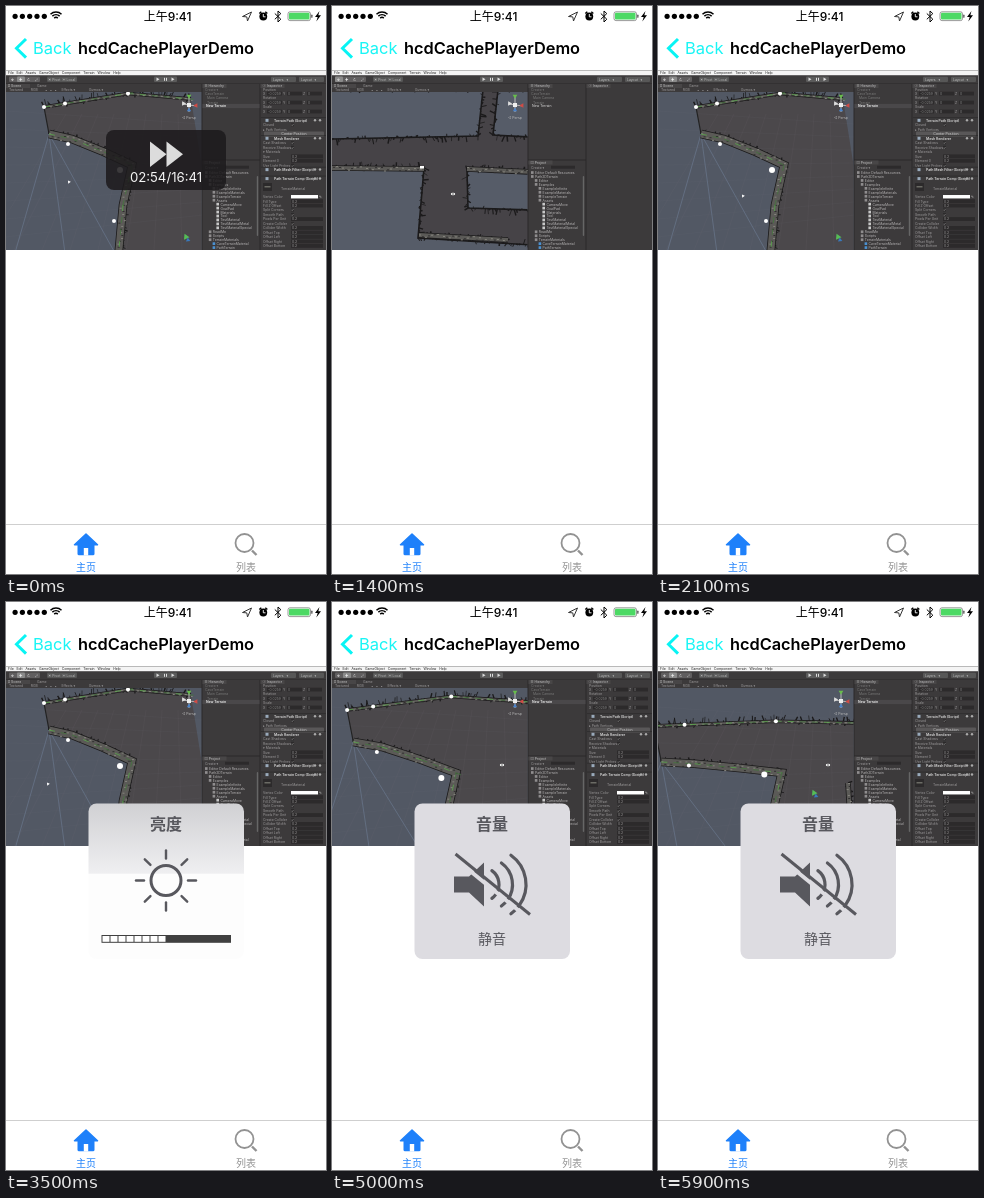
An HTML page with a canvas for the animation above (6 s loop, 320x568 px).

```html
<!DOCTYPE html>
<html lang="zh">
<head>
<meta charset="utf-8">
<style>
html, body { margin: 0; width: 100%; height: 100%; overflow: hidden; background: #fff; }
canvas { display: block; width: 320px; height: 568px; }
</style>
</head>
<body>
<canvas id="stage"></canvas>
<script>
const canvas = document.getElementById('stage');
const ratio = window.devicePixelRatio || 1;
canvas.width = 320 * ratio;
canvas.height = 568 * ratio;
const c = canvas.getContext('2d');
const FONT = "Inter, 'Noto Sans CJK SC', 'Noto Sans CJK', sans-serif";
const LOOP = 6000;
const PANEL = '#3c3a3b', FIELD = '#2c2a2b', SKY = '#525864', GROUND = '#4b484b', INK = '#58585e';

const clamp = (v) => Math.max(0, Math.min(1, v));
const ease = (v) => (v = clamp(v)) * v * (3 - 2 * v);
const mix = (a, b, k) => a + (b - a) * k;
const noise = (n) => { const s = Math.sin(n * 127.1 + 3.7) * 43758.5453; return s - Math.floor(s); };

function rect(x, y, w, h, color) { c.fillStyle = color; c.fillRect(x, y, w, h); }
function round(x, y, w, h, r, color) {
  c.beginPath(); c.roundRect(x, y, w, h, r); c.fillStyle = color; c.fill();
}
function disc(x, y, r, color) {
  c.beginPath(); c.arc(x, y, r, 0, 7); c.fillStyle = color; c.fill();
}
function trace(points, close) {
  c.beginPath();
  points.forEach(([x, y]) => c.lineTo(x, y));
  if (close) c.closePath();
}
function poly(points, color) { trace(points, true); c.fillStyle = color; c.fill(); }
function line(points, color, width = 1, close) {
  trace(points, close); c.strokeStyle = color; c.lineWidth = width; c.stroke();
}
function arc(x, y, r, a, b, color, width) {
  c.beginPath(); c.arc(x, y, r, a, b); c.strokeStyle = color; c.lineWidth = width; c.stroke();
}
// Triangle centred on (x, y), pointing along the angle.
function wedge(x, y, r, angle, color) {
  poly([0, 1, 2].map((i) => {
    const a = angle + i * Math.PI * 2 / 3;
    return [x + r * Math.cos(a), y + r * Math.sin(a)];
  }), color);
}
function text(s, x, y, size, color, align = 'left', weight = 400) {
  c.font = `${weight} ${size}px ${FONT}`;
  c.textAlign = align;
  c.fillStyle = color;
  c.fillText(s, x, y);
}
const tiny = (s, x, y, color = '#9c9a9b', weight = 400) => text(s, x, y, 3.4, color, 'left', weight);

// ---- phone chrome ----
function statusBar() {
  for (let i = 0; i < 5; i++) disc(9.1 + i * 7.3, 10.3, 2.6, '#000');
  for (let r = 2.6; r < 9; r += 2.7) arc(50, 14, r, -2.33, -0.81, '#000', 1.5);
  text('上午9:41', 161.5, 14.5, 12, '#000', 'center', 500);
  line([[236.5, 10.5], [245.5, 6], [241.5, 15], [240.8, 10.9]], '#333', 1, true);
  disc(257.3, 10.5, 3.9, '#000');
  for (const side of [-1, 1]) line([[257.3 + side * 4, 7.5], [257.3 + side * 2, 5.8]], '#000', 1.5);
  line([[257.3, 8], [257.3, 10.8], [259.5, 10.8]], '#fff', 0.9);
  line([[268.8, 7.5], [274.8, 13.2], [272, 16], [272, 5], [274.8, 7.6], [268.8, 13.3]], '#000', 1);
  c.beginPath(); c.roundRect(282, 5.8, 22.5, 8.8, 2); c.strokeStyle = '#555'; c.lineWidth = 0.6; c.stroke();
  round(283, 6.8, 20.5, 6.8, 1, '#4cd964');
  round(305.2, 8.6, 1.3, 3.2, 0.7, '#555');
  poly([[313.5, 5], [309, 11], [311.7, 11], [310.3, 15.5], [315, 9.3], [312.3, 9.3]], '#000');
}

function chrome() {
  const blue = '#1e80fa', grey = '#929292';
  rect(0, 0, 320, 568, '#fff');
  statusBar();
  line([[20, 33], [10.5, 42.3], [20, 51.6]], '#08f4f4', 3);
  text('Back', 27, 48.3, 16.5, '#19f5f5');
  text('hcdCachePlayerDemo', 160, 48.2, 16.35, '#000', 'center', 600);
  rect(0, 64, 320, 0.5, '#aaa');
  rect(0, 518, 320, 0.7, '#bbb');
  const roof = [[80, 528], [91.5, 538.8], [68.5, 538.8]];
  c.lineJoin = 'round';
  poly(roof, blue);
  line(roof, blue, 1.5, true);
  c.lineJoin = 'miter';
  round(71.5, 537, 17, 12.2, 1.5, blue);
  rect(77.8, 542, 4.4, 7.5, '#fff');
  text('主页', 80, 564.5, 10, blue, 'center', 500);
  arc(238.5, 537, 9, 0, 7, grey, 1.8);
  line([[246, 544.5], [250.5, 549]], grey, 2.4);
  text('列表', 240, 564.5, 10, grey, 'center');
}

// ---- editor panels inside the video ----
// Leading spaces give the depth.
const TREE = `Editor Default Resources
Path2DTerrain
 Editor
 Examples
  ExampleInfinite
  ExampleMaterials
  ExampleTerrain
  Assets
   CameraMove
   GoalPad
   Materials
   Tool
   TestMaterial
   TestMaterialMetal
   TestMaterialSpecial
 ReadMe
 Scripts
 TerrainMaterials
  CaveTerrainMaterial
  PathTerrain`.split('\n');

// The first sign gives the row kind: # header, ? checkbox, = value, + vector, ! button, * colour.
const INSPECTOR = `Position
+
Rotation
+
Scale
+

#Terrain Path (Script)
?Closed
▸ Path Vertices
!Center Position
#Mesh Renderer
?Cast Shadows
?Receive Shadows
▾ Materials
=Size
=Element 0
?Use Light Probes
#Path Mesh Filter (Script)

#Path Terrain Comp (Script)



*Vertex Color
=Fill Type
=Fill Z Offset
?Split Corners
?Smooth Path
=Pixels Per Unit
?Create Collider
=Collider Width
=Offset Top
=Offset Left
=Offset Right
=Offset Bottom`.split('\n');

const ROWS = {
  '#': (s, y) => {
    rect(255, y - 4.3, 65, 0.5, '#222');
    rect(259.5, y - 3, 3, 3, '#9ab');
    tiny(s, 268, y, '#ccc', 700);
    disc(309, y - 1.6, 1.2, '#aaa'); disc(314, y - 1.6, 1.2, '#aaa');
  },
  '?': (s, y) => { tiny(s, 257, y); rect(285, y - 3, 3, 3, FIELD); tiny('✓', 285, y, '#ddd'); },
  '=': (s, y) => { tiny(s, 257, y); rect(285, y - 3.3, 32, 3.8, FIELD); tiny('0.2', 286, y); },
  '+': (s, y) => [...'XYZ'].forEach((axis, i) => {
    tiny(axis, 257 + i * 20, y);
    rect(261 + i * 20, y - 3.3, 15, 3.8, FIELD);
    tiny(i ? '0' : '-0.0259', 262 + i * 20, y, '#888');
  }),
  '!': (s, y) => { round(258, y - 3.8, 60, 5, 1, '#595758'); text(s, 288, y, 3.5, '#ccc', 'center'); },
  '*': (s, y) => { tiny(s, 257, y); rect(285, y - 3, 27, 3.4, '#fff'); tiny('✎', 313, y, '#ddd'); }
};

function panel(x, y, w, h, title) {
  rect(x, y, w, h, PANEL);
  rect(x, y, 24, 4, '#484647');
  tiny(title, x + 2, y + 3.3, '#c4c4c4');
}

function inspector() {
  INSPECTOR.forEach((row, i) => {
    const y = 84.5 + i * 4.48, kind = ROWS[row[0]];
    if (kind) kind(row.slice(1), y); else tiny(row, 257, y);
  });
  rect(257, 177, 9, 8, FIELD);
  rect(258.5, 180, 6, 1.5, '#6b6b65');
  tiny('TerrainMaterial', 275, 184);
}

function editor(roomy) {
  rect(0, 64.5, 320, 179.5, '#2a282a');
  rect(0, 64.5, 320, 5, '#f4f4f4');
  tiny('File   Edit   Assets   GameObject   Component   Terrain   Window   Help', 2, 68.3, '#222');
  rect(0, 69.5, 320, 8, PANEL);
  round(3, 70.5, 31, 5.5, 1, '#605e5f');
  round(roomy ? 3 : 11, 70.5, 8, 5.5, 1, '#8a8a8a');
  [...'✥✚↻⤢'].forEach((s, i) => tiny(s, 5 + i * 8, 74.8, '#eee'));
  round(41, 70.5, 30, 5.5, 1, '#555');
  tiny('▣ Pivot  ▣ Local', 42, 74.6, '#bbb');
  round(148, 70.5, 23, 5.5, 1, '#5b5b5b');
  wedge(151.5, 73.3, 2, 0, '#ddd');
  rect(158, 71.8, 1, 3, '#ddd'); rect(160, 71.8, 1, 3, '#ddd');
  wedge(166.5, 73.3, 2, 0, '#ddd');
  ['Layers', 'Layout'].forEach((s, i) => {
    round(265 + i * 28, 70.7, 25, 5.2, 1, '#575757');
    tiny(s + '   ▾', 267 + i * 28, 74.6, '#bbb');
  });
  panel(0, 78, 195.5, 8, '# Scene');
  tiny('Game', 31, 81.3);
  tiny('Textured        RGB        ▪   ▪   ▪     Effects ▾              Gizmos ▾', 3, 85.2);

  panel(196.5, 78, 57, 75.5, '☰ Hierarchy');
  ['Create ▾', 'CaveTerrain', '  Main Camera', '  Terrain']
    .forEach((s, i) => tiny(s, 199, 85.2 + i * 4.1, '#777'));
  if (!roomy) rect(196.5, 97.9, 57, 4.2, '#4a484a');
  tiny('New Terrain', 200, 101.3, '#ddd', roomy ? 400 : 700);

  panel(196.5, 154.5, 57, 89.5, '▤ Project');
  tiny('Create ▾', 199, 162.5);
  rect(219, 159.7, 24, 3, FIELD);
  TREE.forEach((row, i) => {
    const label = row.trim(), depth = row.length - label.length;
    const x = 199 + depth * 3.8, y = 168 + i * 3.95;
    rect(x, y - 2.8, 2.6, 2.7, depth > 2 ? '#c8c8c8' : i > 17 ? '#4b91d0' : '#8f8d8e');
    tiny(label, x + 4, y, '#b4b2b3');
  });
  round(250.8, 170, 1.4, 60, 0.7, '#666');

  panel(254.5, 78, 65.5, 166, 'ⓘ Inspector');
  if (!roomy) inspector();
}

// ---- scene view ----
// Calls visit(x, y, nx, ny, index) at even steps along a polyline; (nx, ny) is the left normal.
function walk(points, step, visit) {
  let index = 0;
  for (let i = 1; i < points.length; i++) {
    const [ax, ay] = points[i - 1], [bx, by] = points[i];
    const length = Math.hypot(bx - ax, by - ay);
    const nx = (by - ay) / length, ny = (ax - bx) / length;
    for (let d = 0; d < length; d += step) {
      visit(mix(ax, bx, d / length), mix(ay, by, d / length), nx, ny, index++);
    }
  }
}
function fringe(points, size, seed) {
  walk(points, 2.4, (x, y, nx, ny, i) => {
    const reach = size * (noise(i + seed) * 1.6 - 0.5), lean = noise(i * 3 + seed) * 5 - 2.5;
    line([[x, y], [x + nx * reach + ny * lean, y + ny * reach - nx * lean]],
      '#1b1a1b', 0.6 + noise(i * 5 + seed));
  });
}
function wall(points, width, size, seed) {
  fringe(points, size + width / 2, seed);
  line(points, '#1b1a1b', width + 1.6);
  line(points, '#5b5a57', width);
  walk(points, 3, (x, y, nx, ny, i) => {
    const o = (noise(i + seed * 2) - 0.5) * width;
    rect(x + nx * o, y + ny * o, 2, 1, i % 2 ? '#302f2f' : '#85847d');
  });
}
function greenMarks(points) {
  walk(points, 12, (x, y, nx, ny, i) =>
    line([[x, y], [x - ny * 6, y + nx * 6]], i % 3 ? '#45753e' : '#58a84b', 0.8));
}

// The camera swings through three views; each wall is a row with its own height.
const VIEWS = [
  { zoom: 1, pan: 0, rim: 101, ledge: 128, tilt: 1 },
  { zoom: 1.24, pan: -32, rim: 108, ledge: 140, tilt: 1 },
  { zoom: 1.45, pan: -59, rim: 124, ledge: 160, tilt: 0.35 }
];
function cave(phase) {
  const from = Math.min(1, Math.floor(phase));
  const at = (key) => mix(VIEWS[from][key], VIEWS[from + 1][key], phase - from);
  const place = (row) => ([x, rise]) => [x * at('zoom') + at('pan'), at(row) + rise * at('tilt')];
  const rim = [[38, 0], [122, -13.5], [185, -8]].map(place('rim'));
  const ledge = [[43, 0], [66, 5], [98, 18], [126, 31]].map(place('ledge'));
  const [cornerX, cornerY] = ledge[3];
  const outline = [...ledge, [cornerX - 9, cornerY + 40], [cornerX - 14, cornerY + 95]];

  rect(0, 86, 196, 158, SKY);
  poly([...rim, [210, 250], ...outline.slice().reverse()], GROUND);
  for (let i = 0; i < 8; i++) {
    line([[i * 28 - 20, 244], [i * 16 + 60, 108]], 'rgba(120,118,122,.2)', 0.5);
    line([[0, 105 + i * 18], [196, 118 + i * 13]], 'rgba(120,118,122,.16)', 0.5);
  }
  for (let i = -1; i < 2; i++) line([ledge[0], [ledge[0][0] + 16 + i * 50, 247]], '#6d7c94', 0.6);
  line([rim[0], ledge[0]], '#222', 1.2);
  wall(rim, 2, 6, 11);
  wall(outline, 7, 3, 40);
  const postX = 190 + 30 * (2 - phase);
  wall([[postX, 181], [postX + 2, 215], [postX - 1, 247]], 4, 4, 70);
  greenMarks(rim);
  greenMarks(outline);

  const knobs = [[38, 0], [59, -3.5], [122, -13.5]].map(place('rim'))
    .concat([[62, 10], [114, 36]].map(place('ledge')), [[cornerX - 18, cornerY + 56]]);
  knobs.forEach(([x, y], i) => disc(x, y, i === 4 ? 3 : 2, '#fff'));
  wedge(180 - 12 * phase, 231 - 20 * phase, 3.5, -2, '#55bd56');
  wedge(182 - 12 * phase, 234 - 20 * phase, 2.5, 0.4, '#3979bd');
}

function tunnels() {
  rect(0, 86, 196, 158, '#464347');
  const right = 199, bottom = 250;
  const blocks = [
    [[-3, 84], [151, 84], [146, 130], [-3, 133]],
    [[166, 84], [right, 84], [right, 131], [161, 129]],
    [[-3, 162], [92, 162], [86, 232], [right, 239], [right, bottom], [-3, bottom]],
    [[135, 164], [right, 166], [right, 204], [136, 202]]
  ];
  blocks.forEach((block, i) => {
    poly(block, '#565c68');
    line(block, '#1b1a1b', 1.6, true);
    fringe([...block, block[0]], 6, 90 + i * 31);
  });
  wall([[-2, 162], [92, 163]], 4, 2, 5);
  wall([[135, 163], [right, 166]], 4, 2, 6);
  wall([[87, 229], [176, 234]], 4, 2, 7);
  rect(88, 160, 4, 2.5, '#fff');
}

function gizmo() {
  line([[183, 90], [183, 106]], '#bbb', 1);
  line([[176, 98], [191, 100]], '#bbb', 1);
  wedge(183, 90, 2.7, Math.PI / 2, '#67bd4b');
  wedge(190, 99.5, 2.7, Math.PI, '#cf4b45');
  wedge(177.5, 97.5, 2.7, 0, '#ddd');
  wedge(183, 104, 2.5, -Math.PI / 2, '#4a82c8');
  rect(181, 97, 4, 4, '#eee');
  text('◁ Persp', 183, 112.5, 3.5, '#bbb', 'center');
}

// The mouse rests at a few spots and glides between them.
function pointer(t, roomy) {
  let x = 63, y = 176;
  const glide = (start, end, toX, toY) => {
    const k = ease((t - start) / (end - start));
    x = mix(x, toX, k); y = mix(y, toY, k);
  };
  glide(100, 800, 85, 190);
  glide(2400, 3400, 42, 182);
  glide(3700, 4200, 301, 197);
  glide(4400, 5000, 170, 163);
  if (roomy) { x = 121; y = 188; }
  if (roomy || t > 4800) {
    c.beginPath(); c.ellipse(x, y, 2.2, 1.3, 0, 0, 7); c.fillStyle = '#fff'; c.fill();
    disc(x, y, 0.7, '#222');
  } else {
    wedge(x, y, 1.8, -2.2, '#fff');
  }
}

function video(t) {
  const roomy = t >= 1000 && t < 2100;
  editor(roomy);
  c.save();
  c.beginPath(); c.rect(0, 86, 195.5, 158); c.clip();
  if (roomy) tunnels();
  else cave(ease((t - 4400) / 600) + ease((t - 5000) / 900));
  gizmo();
  c.restore();
  pointer(t, roomy);
}

// ---- overlays ----
function seekPanel() {
  round(100, 124, 120, 60, 8, 'rgba(28,26,28,.86)');
  for (const x of [144, 160.5]) poly([[x, 135.5], [x, 161], [x + 16.5, 148.2]], '#dcdcdc');
  text('02:54/16:41', 160, 175.6, 13.2, '#f4f4f4', 'center');
}

function card(title, glass) {
  round(82.5, 201.5, 155.5, 155.5, 8, glass);
  text(title, 160, 227.5, 16, INK, 'center', 600);
}

function brightnessPanel(t) {
  const glass = c.createLinearGradient(0, 201, 0, 272);
  glass.addColorStop(0, '#d0d0d3');
  glass.addColorStop(0.99, '#efeff1');
  glass.addColorStop(1, '#fdfdfd');
  card('亮度', glass);
  arc(160, 278.5, 15, 0, 7, INK, 3);
  c.lineCap = 'round';
  for (let a = 0; a < 6.2; a += Math.PI / 4) {
    const ray = [22, 30].map((r) => [160 + r * Math.cos(a), 278.5 + r * Math.sin(a)]);
    line(ray, INK, 2.4);
  }
  c.lineCap = 'butt';
  rect(95.5, 333, 129.5, 7.8, '#404040');
  const level = Math.round(mix(11, 8, ease((t - 2600) / 800)));
  for (let i = 0; i < level; i++) rect(96.5 + i * 8, 334, 7, 5.8, '#fff');
}

function volumePanel(muted) {
  card('音量', '#dddce1');
  poly([[122, 274.5], [137, 274.5], [152, 260.5], [152, 304.5], [137, 290.5], [122, 290.5]], INK);
  c.lineCap = 'round';
  for (let i = 0; i < 3; i++) arc(150 + i * 4, 282.5, 17 + i * 9.5, -0.95, 0.95, INK, 3.2);
  c.lineCap = 'butt';
  if (muted) {
    line([[121, 255], [197, 317]], '#dddce1', 4);
    line([[123.5, 252], [198, 312.5]], INK, 3);
    text('静音', 160, 342, 14, INK, 'center');
  }
}

function draw(t) {
  c.setTransform(ratio, 0, 0, ratio, 0, 0);
  chrome();
  video(t);
  if (t < 800) seekPanel();
  else if (t >= 3800) volumePanel(t >= 4600);
  else if (t >= 2400) brightnessPanel(t);
}

const start = performance.now();
function tick() {
  draw((performance.now() - start) % LOOP);
  requestAnimationFrame(tick);
}
tick();
</script>
</body>
</html>
```
